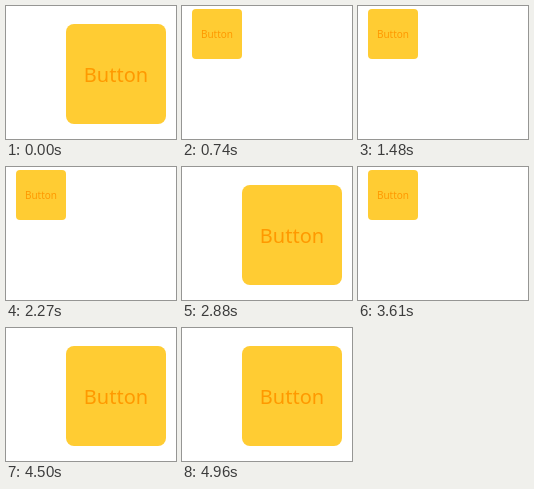
Write an HTML page that moves like this. It is 170x133 px and loops after 5.6 s.

```html
<!DOCTYPE html>
<html lang="en">
<head>
<meta charset="utf-8">
<title>Button</title>
<style>
  html, body { margin: 0; width: 100%; height: 100%; overflow: hidden; background: #fff; }
  svg { display: block; }
  rect { fill: #fc3; }
  text { fill: #f90; font: 20px "Noto Sans", "Open Sans", sans-serif; text-anchor: middle; }
</style>
</head>
<body>
<svg width="170" height="133" viewBox="0 0 170 133">
  <g id="button">
    <rect width="100" height="100" rx="8"/>
    <text x="50" y="58">Button</text>
  </g>
</svg>
<script>
const LOOP = 5600;
const TOGGLES = [740, 1070, 1480, 1810, 2270, 2880, 3610, 3890, 4270, 4500, 4810, 4960];
const LARGE = 'translate(60 18)';
const SMALL = 'translate(10 3) scale(.5)';
const button = document.getElementById('button');

function draw() {
  const time = performance.now() % LOOP;
  const count = TOGGLES.filter(t => t <= time).length;
  button.setAttribute('transform', count % 2 ? SMALL : LARGE);
  requestAnimationFrame(draw);
}
draw();
</script>
</body>
</html>
```
